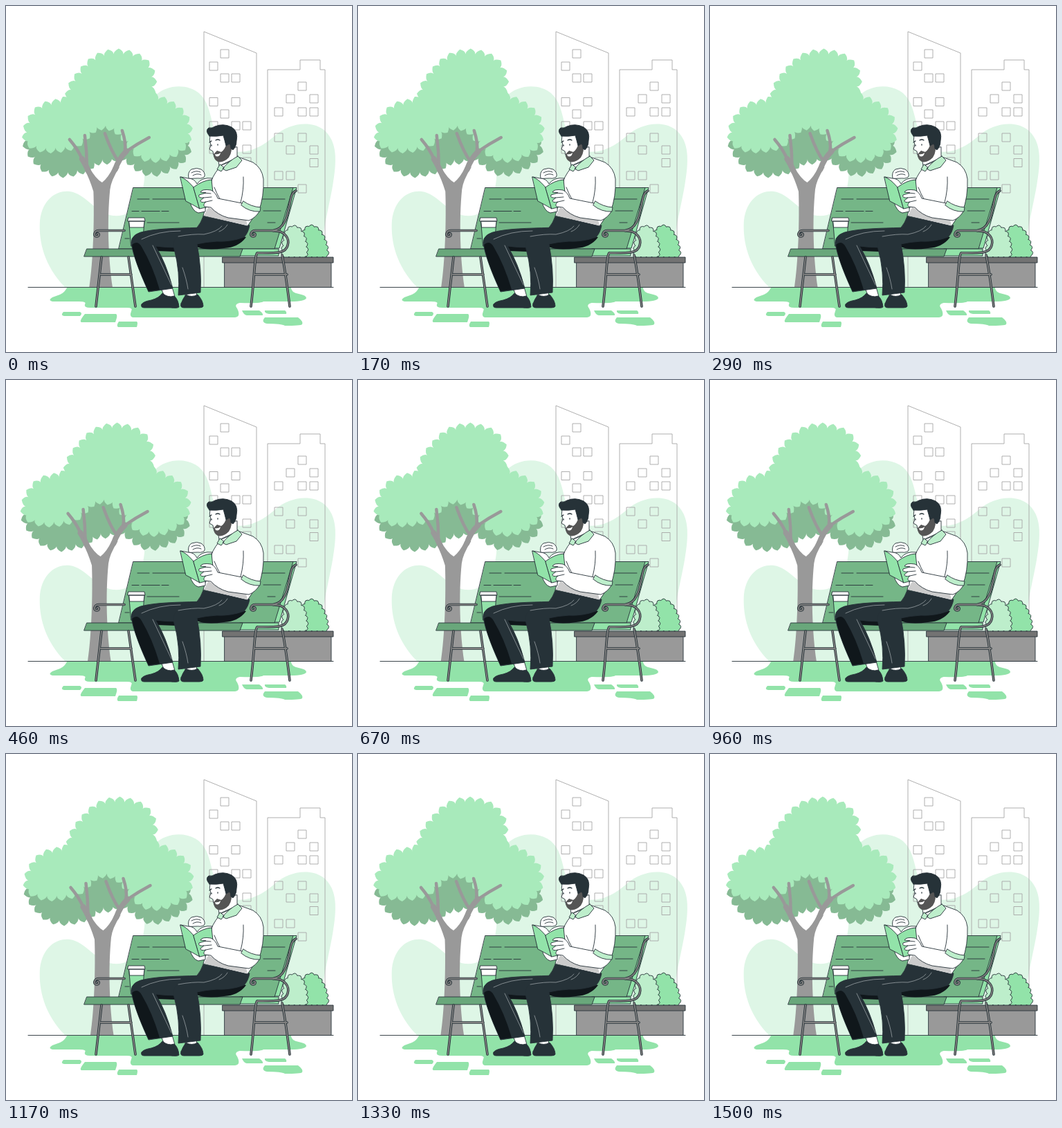
Recreate the animation shown at these times as an HTML page. Size 500 by 500 pixels, loop 1540 ms.

```html
<!DOCTYPE html>
<html lang="en">
<head>
<meta charset="utf-8">
<title>Reading in the park</title>
<style>
  html, body { margin: 0; width: 100%; height: 100%; overflow: hidden; background: #fff; }
  svg { display: block; width: 100%; height: 100%; }
  .ink { stroke: #263238; stroke-width: .9; stroke-linecap: round; stroke-linejoin: round; }
  .city { fill: none; stroke: #a6a6a6; stroke-width: .9; }
  .branch { fill: none; stroke: #999; stroke-linecap: round; stroke-linejoin: round; }
  .tube { fill: none; stroke-linecap: round; stroke-linejoin: round; }
  .none { fill: none; }
  .white { fill: #fff; }
  .mint { fill: #92e3a9; }
  .pale { fill: #bdeecb; }
  .wood { fill: #75b687; }
  .dark { fill: #263238; }
  .shade { fill: #10171b; stroke: none; }
  .fold { fill: none; stroke: #a9b0b3; stroke-width: .7; }
</style>
</head>
<body>
<svg viewBox="0 0 500 500">
  <defs>
    <path id="leftFrame" d="M138 363L130 434M177 363L187 434M137 388H181M171 324.500H134C127 325 126 333 131 333C135 333 135 328 132 329"/>
    <path id="rightFrame" d="M363 357C359 360 359 395 354 434M399 360C404 385 407 410 410 434M360 388H406M386 324.500H360C353 325 352 333 357 333C361 333 361 328 358 329M386 324.500C405 322 407 300 411 281Q413 269 419 267M386 325C404 324 410 337 407 346C404 358 390 357 363 357"/>
  </defs>

  <path fill="#def6e6" d="M85 406C55 375 47 340 49 310C53 277 75 266 92 268C115 271 130 300 155 303C185 305 196 285 200 250C203 215 195 150 215 130C232 113 262 112 279 126C303 147 292 190 320 207C345 218 372 203 390 186C408 171 438 164 458 178C480 195 478 225 472 260C465 300 455 330 450 406Z"/>

  <g class="city">
    <path d="M286 406V37L362 68V300M378 300V92H425V78H454V92H461V363"/>
    <path id="windows"/>
  </g>

  <g class="mint">
    <path d="M88 407H412Q412 414 423 416Q434 418 434 422Q432 427 412 427H372Q369 430 338 429Q329 431 334 437Q340 449 331 450H183Q178 449 181 441Q184 436 175 436H122Q112 436 114 431Q117 427 105 427H67Q60 425 67 421L78 417Q85 414 88 407Z"/>
    <path d="M83 442H107Q111 444 107 448H84Q78 447 83 442ZM114 445H159Q162 446 158 457H109Q105 456 114 445ZM163 456H189Q191 457 189 464H162Q159 462 163 456ZM341 440H366Q372 444 371 447H348Q344 447 341 440ZM374 440H403Q406 442 405 445H380Q373 444 374 440ZM374 450H422Q430 456 428 460Q426 462 403 462Q398 459 377 459Q368 457 374 450Z"/>
  </g>
  <path class="ink" d="M32 406.500H473"/>

  <path id="bushFront" class="ink mint"/>
  <path id="bushBack" class="ink pale"/>
  <g class="ink">
    <path fill="#999" d="M316 370H470V406.500H316Z"/>
    <path fill="#737373" d="M313 363H473V371H313Z"/>
  </g>

  <g id="tree">
    <path id="leavesBack" fill="#86ba94"/>
    <path id="leavesFront" fill="#a8eabb"/>
    <path fill="#999" d="M120.500 406C126 370 128 310 126.500 268Q121 250 114 237L121 234Q130 250 139 255Q148 248 155 233L164 233Q152 252 150.500 265C146 310 148 365 154 406Z"/>
    <g class="branch">
      <path stroke-width="8" d="M119 238Q114 227 110 221M158 236Q163 221 174 210"/>
      <path stroke-width="4.500" d="M110 221Q104 207 92 193M174 210Q190 199 207 190M117 232Q117 210 114 187M163 225Q153 212 143 184M172 209Q174 198 168 180"/>
    </g>
  </g>

  <g class="ink">
    <path class="mint" d="M411 262.500H420L395 350H380Z"/>
    <path class="wood" d="M184 262.500H415L388 351H163Z"/>
    <path class="none" d="M190 279H207M212 279H263M329 279H352M360 279H403M182 296.500H192M196 296.500H222M225 296.500H235M372 296H397M204 313H250M378 313H389M172 336H178"/>
    <path class="mint" d="M338 351H394V361H337Z"/>
    <path fill="#69a77b" d="M117 351H342L338 362H113Z"/>
  </g>
  <g class="tube">
    <use href="#leftFrame" stroke="#263238" stroke-width="3.600"/>
    <use href="#leftFrame" stroke="#808080" stroke-width="1.800"/>
  </g>
  <g class="ink">
    <path class="mint" d="M178 311H200L197 347H181Z"/>
    <path class="white" d="M178 311H200L199 320H179ZM177 306H200L201 311H176Z"/>
  </g>

  <g class="ink">
    <path class="white" d="M224 408L230 422L244 420L240 406ZM258 413L260 422L276 421L275 411Z"/>
    <path class="dark" d="M196 431Q198 427 210 425Q221 422 226 415Q234 422 243 419Q249 424 250 435Q248 437 238 436H200Q194 436 196 431ZM253 430Q255 424 260 417Q268 422 277 417Q285 426 285 434Q284 436 279 436H257Q251 436 253 430Z"/>
    <path class="shade" d="M212 342L250 346L330 330L347 334Q336 349 315 350Q290 354 275 348L245 355L218 354Z"/>
    <path class="dark" d="M286 320C260 321 225 321 204 325Q181 328 181 342Q184 365 206 413L241 408Q231 370 216 347Q230 349 250 349L300 338Z"/>
    <path class="shade" d="M182 345Q186 370 206 412L222 410Q212 375 196 348Q190 338 182 345Z"/>
    <path class="dark" d="M285 304L352 317Q350 328 344 334Q325 341 305 340Q288 341 276 344Q283 380 281 414L249 418Q252 385 243 351Q238 331 263 329Q278 324 285 304Z"/>
    <path class="fold" d="M196 337Q220 325 252 325M212 346L239 403M249 333Q270 329 286 330Q306 326 312 318M255 378Q261 395 263 409M320 316Q316 323 308 326"/>

    <path class="white" d="M312 230Q302 239 296 254L290 283Q288 294 285 303L349 318Q355 308 365 297Q373 276 372 250Q370 234 357 226L338 219Z"/>
    <path fill="#ccc" stroke="none" d="M292 291Q318 301 347 309L349 317L286 303Z"/>
    <path class="none" d="M343 247Q344 265 339 284M301 262Q304 270 309 279"/>

    <path class="white" d="M305 210L308 231L334 219V204Z"/>
    <path class="white" d="M295 187Q293 194 296 201L294 207L299 210Q300 222 308 224Q320 219 326 202L322 182Z"/>
    <path fill="#555" stroke="none" d="M325 198Q328 210 322 219Q314 227 306 225Q300 222 300 214L305 209L311 211Q317 207 319 197Z"/>
    <path class="white" stroke="none" d="M302 214Q307 215 310 212Q309 219 303 217Z"/>
    <path class="dark" d="M294 188Q287 180 293 176Q298 177 302 174Q314 169 326 175Q336 181 333 195Q333 203 328 208L325 206Q325 201 323 199L318 202Q316 194 314 187Q304 189 294 188Z"/>
    <path class="none" stroke-width="1.300" d="M294 197L297 195M303 194Q306 192 309 194M297 201V202M306 200V201"/>
    <path class="pale" d="M309 229L305 236L311 239L315 234ZM335 217L341 223L333 233L318 238L313 235Q322 224 335 217Z"/>

    <path class="white" d="M264 249Q262 240 268 236Q276 233 282 236Q288 240 287 246Q284 250 278 249ZM268 241Q275 237 281 240M270 245Q276 241 282 244"/>
    <path class="white" d="M266 284Q270 297 278 299L288 297L288 288Z"/>
    <path class="white" d="M253 247L263 249Q272 249 276 257Q283 247 298 249L296 257L274 265Z"/>
    <path class="mint" d="M252 247Q260 249 271 262L280 293Q268 286 260 282Z"/>
    <path class="mint" d="M271 262Q284 252 297 251L301 288L280 293Z"/>

    <path class="white" d="M341 285Q321 281 306 278Q303 269 296 266Q283 264 281 269L289 270L279 273Q277 278 286 277L281 281Q281 285 289 283Q284 287 287 290L296 291Q306 302 321 306L351 310Q361 306 366 297Z"/>
    <path class="none" d="M286 270L296 271M286 277L297 276M289 283L298 281"/>
    <path class="pale" d="M343 282Q354 290 368 291L367 297Q352 298 340 288Z"/>
  </g>

  <g class="tube">
    <use href="#rightFrame" stroke="#263238" stroke-width="3.600"/>
    <use href="#rightFrame" stroke="#808080" stroke-width="1.800"/>
  </g>
</svg>
<script>
  const $ = id => document.getElementById(id);

  // Replaces a clockwise outline by a row of pointed leaves.
  function leafy(id, outline, size, height) {
    const path = $(id);
    path.setAttribute('d', outline);
    const length = path.getTotalLength(), count = Math.round(length / size);
    const at = i => path.getPointAtLength(length * (i % count) / count);
    let d = `M${at(0).x} ${at(0).y}`;
    for (let i = 0; i < count; i++) {
      const a = at(i), b = at(i + 1);
      const span = Math.hypot(b.x - a.x, b.y - a.y) || 1;
      const nx = (b.y - a.y) / span * height, ny = (a.x - b.x) / span * height;
      d += `Q${a.x + nx * .5} ${a.y + ny * .5} ${(a.x + b.x) / 2 + nx} ${(a.y + b.y) / 2 + ny}`
         + `Q${b.x + nx * .6} ${b.y + ny * .6} ${b.x} ${b.y}`;
    }
    path.setAttribute('d', d + 'Z');
  }

  leafy('leavesBack', 'M30 194C80 150 220 150 263 200C262 215 250 228 238 231C222 243 200 242 190 231C180 224 172 214 166 212C158 222 148 224 138 221C130 218 124 226 116 234C100 238 85 243 72 240C55 236 45 226 40 213C32 208 30 200 30 194Z', 14, 8);
  leafy('leavesFront', 'M92 135C92 119 101 106 112 96C120 83 135 72 150 70C172 67 195 73 205 88C213 102 212 117 207 130C222 138 250 144 260 166C266 183 262 200 250 206C236 220 205 224 190 212C180 200 172 185 160 176C150 169 132 169 122 177C112 193 98 205 80 203C60 209 36 203 29 192C31 168 46 144 67 143C77 142 86 141 92 135Z', 14, 8);
  leafy('bushBack', 'M401 362C400 340 403 322 414 319C428 318 435 338 434 362Z', 8, 3);
  leafy('bushFront', 'M426 362C424 335 430 318 442 318C456 322 464 342 464 362Z', 8, 3);

  // Each row: top edge, then the left edges of its windows.
  $('windows').setAttribute('d', [
    [63, 310], [81, 294], [98, 310, 326], [132.5, 294, 326], [150, 310],
    [167, 294, 326, 342], [201, 294, 342], [219, 342],
    [110, 422], [128, 405, 439], [147, 388, 422, 439], [184, 388, 422],
    [202, 405, 439], [220.5, 439], [239, 388, 405], [258, 422]
  ].flatMap(([y, ...xs]) => xs.map(x => `M${x} ${y}h12v12h-12z`)).join(''));

  // The tree shakes sideways: one offset per tenth of the cycle.
  const shake = [0, -1, 2, -4, 4, -4, 4, -4, 2, -1, 0];
  const LOOP = 1540, CYCLE = 1500, STEP = 1000 / 24;

  function draw(now) {
    const step = Math.min(36, Math.floor((now % LOOP + 4) / STEP));
    const phase = (step + .5) * STEP / CYCLE % 1 * 10;
    const i = Math.floor(phase);
    const x = shake[i] + (shake[i + 1] - shake[i]) * (phase - i);
    $('tree').setAttribute('transform', `translate(${x.toFixed(2)} 0)`);
  }

  let start;
  function tick(now) {
    start ??= now;
    draw(now - start);
    requestAnimationFrame(tick);
  }
  draw(0);
  requestAnimationFrame(tick);
</script>
</body>
</html>
```
